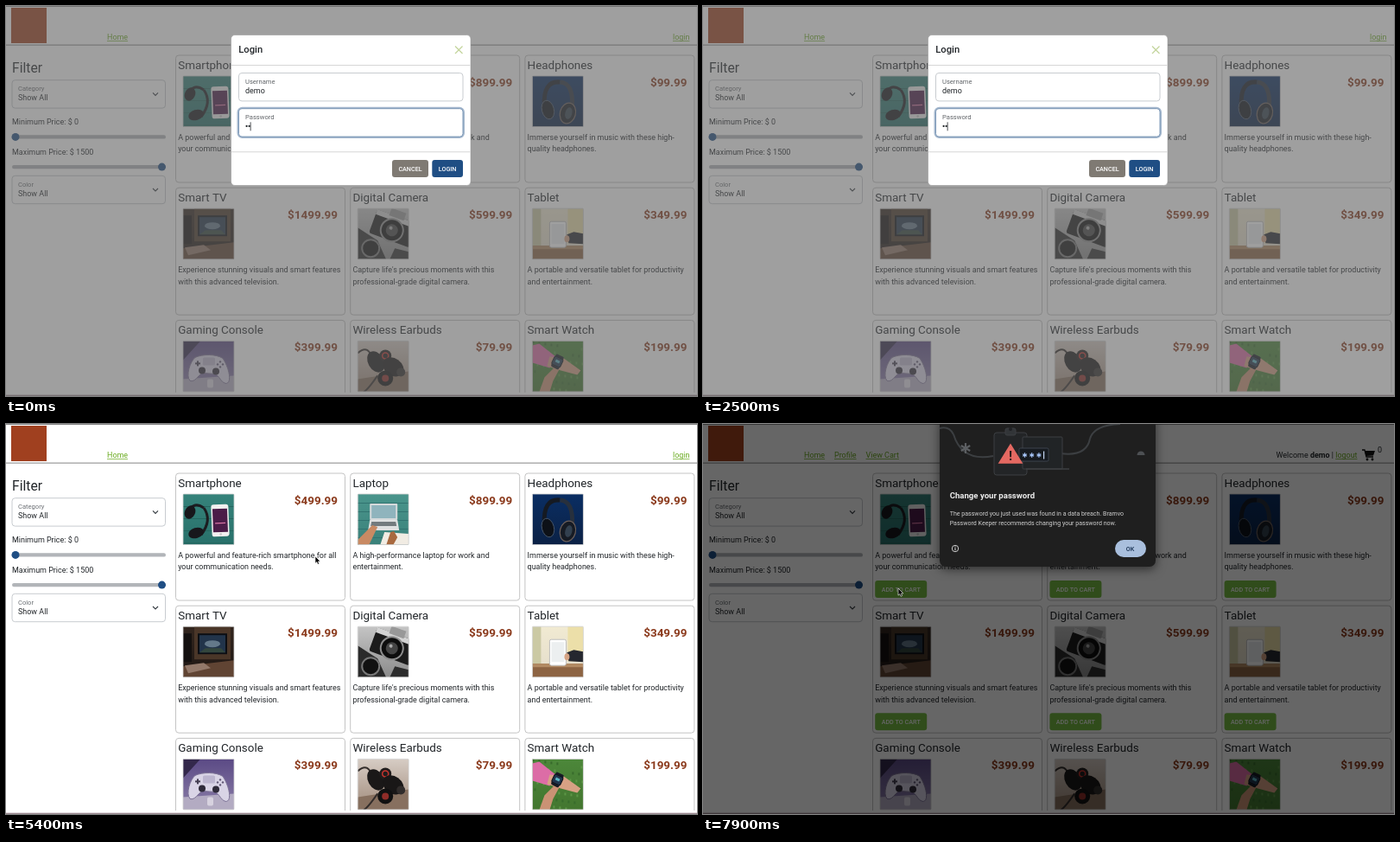
Recreate the animation shown at these times as an HTML page with a canvas. Size 800 px wide and 451 px high, loop 8000 ms.

```html
<!DOCTYPE html>
<html lang="en">
<head>
<meta charset="utf-8">
<title>Shop login</title>
<style>
  html, body { margin: 0; width: 100%; height: 100%; overflow: hidden; background: #fff; }
  canvas { display: block; width: 800px; height: 451px; }
</style>
</head>
<body>
<canvas id="stage" width="800" height="451"></canvas>
<script>
const c = document.getElementById('stage').getContext('2d');
const LOOP = 8000, STEP = 100;
const BODY = 8.96, HEAD = 13.44, LABEL = 7.6, BUTTON = 7.2;
const INK = '#212529', GREEN = '#6aab1f', RUST = '#a0401f', NAVY = '#1f4e84';
const ACCOUNT = 'demo';

// Times (ms) of the story
const MODAL_END = 4600, LOGGED_IN = 7000, ALERT_START = 7800;
const TYPE_START = 2600, TYPE_STEP = 120;
// [time, x, y] of the pointer tip
const PATH = [[3600, 452, 150], [4300, 511, 193], [4700, 511, 193], [5300, 358, 153],
  [5500, 358, 153], [6200, 337, 180], [6800, 337, 180], [7600, 226, 190]];

// ---- helpers ----
function text(s, x, y, size, color = INK, weight = 400, align = 'left') {
  c.font = `${weight} ${size}px Roboto, sans-serif`;
  c.textAlign = align;
  c.fillStyle = color;
  c.fillText(s, x, y);
}
function rect(x, y, w, h, color) {
  c.fillStyle = color;
  c.fillRect(x, y, w, h);
}
function box(x, y, w, h, r, fill, stroke, line = 1) {
  c.beginPath();
  c.roundRect(x, y, w, h, r);
  paint(fill, stroke, line);
}
function paint(fill, stroke, line = 1) {
  if (fill) { c.fillStyle = fill; c.fill(); }
  if (stroke) { c.strokeStyle = stroke; c.lineWidth = line; c.stroke(); }
}
function disc(x, y, rx, fill, stroke, line, ry = rx, turn = 0) {
  c.beginPath();
  c.ellipse(x, y, rx, ry, turn, 0, 7);
  paint(fill, stroke, line);
}
function poly(points, fill, stroke, line) {
  c.beginPath();
  for (let i = 0; i < points.length; i += 2) c.lineTo(points[i], points[i + 1]);
  if (fill) c.closePath();
  paint(fill, stroke, line);
}
function curve(x1, y1, x2, y2, x3, y3, color, line) {
  c.beginPath();
  c.moveTo(x1, y1);
  c.quadraticCurveTo(x2, y2, x3, y3);
  paint(null, color, line);
}
function turned(x, y, angle, draw) {
  c.save();
  c.translate(x, y);
  c.rotate(angle);
  draw();
  c.restore();
}
function shade(top, bottom) {
  const g = c.createLinearGradient(0, 0, 0, 59);
  g.addColorStop(0, top);
  g.addColorStop(1, bottom);
  rect(0, 0, 59, 59, g);
}
function planks(step, color) {
  for (let y = step; y < 59; y += step) rect(0, y, 59, 1, color);
}
function link(s, x, y, color = GREEN) {
  text(s, x, y, BODY, color);
  rect(x, y + 1.2, c.measureText(s).width, 0.7, color);
}
function button(s, x, y, w, color) {
  box(x, y, w, 20, 3, color);
  text(s, x + w / 2, y + 12.7, BUTTON, '#fff', 500, 'center');
}

// ---- product pictures, 59 by 59 ----
function phonePic() {
  shade('#36837b', '#28706a');
  planks(14, '#25665f');
  curve(7, 20, 12, 8, 24, 16, '#1c1c20', 3);
  curve(24, 16, 34, 30, 21, 47, '#1c1c20', 3);
  disc(8, 21, 6, '#17171b', null, 0, 8, 0.4);
  disc(15, 45, 9, '#17171b', null, 0, 6, -0.3);
  turned(43, 31, -0.04, () => {
    box(-10, -19, 20, 37, 3, '#f2f0f0');
    rect(-8.5, -14, 17, 27, '#4b1c48');
    rect(-6, 2, 12, 1.2, '#d774a4');
    disc(0, 15.5, 1.4, '#ccc');
  });
}
function laptopPic() {
  shade('#4a958c', '#3a817a');
  planks(10, '#317370');
  box(14, 11, 32, 19, 1, '#d5dadb');
  rect(16, 13, 28, 15, '#8fb4bd');
  poly([14, 30, 46, 30, 48, 42, 12, 42], '#dfe1e1');
  poly([16, 32, 44, 32, 45, 37, 15, 37], '#737b7e');
  poly([26, 59, 31, 44, 59, 46, 59, 59], '#f1ece3');
  poly([0, 59, 0, 53, 17, 36, 23, 38, 13, 59], '#c98a63');
  poly([33, 59, 38, 44, 42, 43, 46, 50, 41, 59], '#a8693f');
}
function headphonePic() {
  shade('#0a2e63', '#0b2145');
  curve(14, 35, 12, 5, 32, 7, '#151a22', 5);
  curve(32, 7, 48, 8, 46, 37, '#27303d', 5);
  disc(18, 39, 7, '#0d1118', '#465568', 1, 11, -0.25);
  disc(41, 43, 9, '#161b24', '#6c5f5a', 1.2, 12, 0.25);
  disc(42, 43, 4, '#32404f', null, 0, 7, 0.25);
}
function tvPic() {
  shade('#33261e', '#1d1613');
  rect(13, 0, 42, 38, '#4a3628');
  rect(17, 8, 34, 24, '#0c0e13');
  rect(19, 10, 30, 20, '#22344a');
  disc(34, 20, 9, '#64798a', null, 0, 4);
  poly([19, 30, 26, 25, 44, 25, 49, 30], '#33463d');
  poly([0, 46, 59, 39, 59, 59, 0, 59], '#604433');
  poly([2, 45, 24, 42, 32, 48, 6, 54], '#93796a');
  rect(0, 8, 10, 33, '#14100f');
}
function cameraPic() {
  shade('#c4c4c4', '#8b8b8b');
  poly([0, 22, 23, 37, 33, 59, 0, 59], '#2a2a2a');
  turned(40, 21, 0.35, () => {
    box(-23, -13, 50, 29, 3, '#1b1b1b');
    rect(-23, -13, 50, 6, '#d2d2d2');
    rect(-8, -20, 18, 9, '#989898');
    disc(1, 4, 13, '#0d0d0d', '#8d8d8d', 2);
    disc(1, 4, 7, '#454545');
    disc(-1, 2, 2, '#aaa');
  });
  disc(15, 46, 10, '#111', '#777', 2);
  poly([37, 59, 43, 46, 59, 50, 59, 59], '#2c2c2c');
}
function tabletPic() {
  shade('#f1ead2', '#e3dccb');
  rect(0, 0, 10, 44, '#cbc9a4');
  rect(41, 0, 18, 40, '#ecdfa9');
  rect(0, 43, 59, 16, '#8d6443');
  rect(0, 43, 59, 4, '#b28a63');
  box(20, 15, 19, 30, 2, '#fff', '#bdbdbd');
  rect(22, 18, 15, 23, '#eceff0');
  poly([40, 30, 48, 27, 59, 29, 59, 41, 42, 40], '#25272f');
  disc(40, 35, 3, '#d5a384', null, 0, 4);
}
function consolePic() {
  shade('#5b4a85', '#8b7ea8');
  poly([0, 0, 20, 0, 0, 22], '#33284b');
  poly([0, 59, 0, 44, 59, 40, 59, 59], '#b3abc2');
  c.beginPath();
  c.moveTo(14, 19);
  c.bezierCurveTo(23, 15, 38, 15, 46, 20);
  c.bezierCurveTo(54, 32, 57, 50, 49, 49);
  c.bezierCurveTo(43, 47, 42, 40, 37, 38);
  c.lineTo(22, 37);
  c.bezierCurveTo(17, 40, 14, 48, 8, 46);
  c.bezierCurveTo(3, 40, 8, 24, 14, 19);
  paint('#d9d4e6', '#7d7396');
  box(23, 19, 14, 9, 1.5, '#bcb5cf');
  disc(22, 34, 4, '#2f2b3a');
  disc(38, 35, 4, '#2f2b3a');
  rect(14, 25, 6, 2, '#443e52');
  rect(16, 23, 2, 6, '#443e52');
  for (let i = 0; i < 4; i++) disc(43 + 3 * Math.cos(i * 1.571), 27 + 3 * Math.sin(i * 1.571), 1.2, '#605775');
  box(28, 44, 7, 10, 2, '#d7d2df');
}
function budsPic() {
  shade('#d6ccc4', '#a08a7a');
  poly([0, 59, 0, 44, 59, 35, 59, 59], '#87705f');
  curve(0, 14, 13, 2, 18, 24, '#332d2b', 2);
  curve(23, 40, 12, 56, 7, 59, '#332d2b', 2);
  disc(21, 24, 9, '#1a1818', null, 0, 13, -0.5);
  disc(32, 17, 7, '#211d1d');
  disc(32, 17, 3.5, '#211d1d', '#c9342e', 1.5);
  disc(41, 30, 13, '#191717', null, 0, 10, 0.6);
  disc(32, 43, 9, '#111');
  disc(32, 43, 4, '#8f2c28');
  disc(50, 36, 5, '#302c2b');
}
function watchPic() {
  shade('#4c873a', '#43762f');
  for (let i = 0; i < 40; i++) rect(i * 23 % 59, i * 37 % 59, 2, 3, i % 2 ? '#5c9646' : '#386b2c');
  poly([0, 5, 8, 3, 27, 18, 20, 31, 0, 25], '#dc6da6');
  poly([20, 18, 35, 19, 56, 34, 52, 39, 33, 34, 17, 29], '#d7a184');
  poly([8, 59, 14, 42, 27, 29, 31, 33, 24, 46, 20, 59], '#cb9274');
  turned(29, 24, 0.45, () => {
    box(-5, -8, 10, 16, 2, '#171b24');
    box(-5.5, -5, 11, 10, 2, '#20344b', '#0d1118');
    rect(-2.5, -2, 5, 3, '#5bb5c3');
  });
}

const PRODUCTS = [
  ['Smartphone', '499.99', 'A powerful and feature-rich smartphone for all', 'your communication needs.', phonePic],
  ['Laptop', '899.99', 'A high-performance laptop for work and', 'entertainment.', laptopPic],
  ['Headphones', '99.99', 'Immerse yourself in music with these high-', 'quality headphones.', headphonePic],
  ['Smart TV', '1499.99', 'Experience stunning visuals and smart features', 'with this advanced television.', tvPic],
  ['Digital Camera', '599.99', "Capture life's precious moments with this", 'professional-grade digital camera.', cameraPic],
  ['Tablet', '349.99', 'A portable and versatile tablet for productivity', 'and entertainment.', tabletPic],
  ['Gaming Console', '399.99', '', '', consolePic],
  ['Wireless Earbuds', '79.99', '', '', budsPic],
  ['Smart Watch', '199.99', '', '', watchPic]
];

function card([name, price, line1, line2, picture], i, member) {
  const x = 196.5 + i % 3 * 202.2, y = 57 + Math.floor(i / 3) * 153.2;
  box(x, y, 196, 147, 3.5, '#fff', '#c4c4c4');
  text(name, x + 2.7, y + 16, HEAD);
  text('$' + price, x + 187.5, y + 36, HEAD, '#8b3a1c', 700, 'right');
  c.save();
  c.translate(x + 8.5, y + 24);
  c.beginPath();
  c.rect(0, 0, 59, 58.5);
  c.clip();
  picture();
  c.restore();
  box(x + 8.5, y + 24, 59, 58.5, 1, null, '#d0d0d0', 0.8);
  text(line1, x + 2.7, y + 98, BODY);
  text(line2, x + 2.7, y + 111.3, BODY);
  if (member) button('ADD TO CART', x + 2.7, y + 124, 60, '#78bf45');
}
function select(label, y) {
  box(7, y, 177.5, 32.4, 3.5, '#fff', '#c8ccd0');
  text(label, 14, y + 12.7, LABEL, '#6c7075');
  text('Show All', 14, y + 23.5, BODY);
  poly([170, y + 14.7, 173, y + 17.7, 176, y + 14.7], null, '#343a40', 1.1);
}
function slider(label, y, knob) {
  text(label, 7, y, BODY);
  box(7, y + 12.2, 178, 4.4, 2.2, '#b2b5b9');
  disc(knob, y + 14.4, 4.5, NAVY);
}
function cartIcon() {
  poly([763, 30, 766, 30, 768, 38, 776, 38], null, '#111', 1.3);
  poly([766, 31, 778, 31, 776, 36.5, 767.5, 37], '#111');
  disc(769, 41, 1.4, '#111');
  disc(775, 41, 1.4, '#111');
}
function greeting(right) {
  const parts = [['logout', 400], [' | ', 400], [ACCOUNT, 700], ['Welcome ', 400]];
  let x = right;
  for (const [s, weight] of parts) {
    c.font = `${weight} ${BODY}px Roboto, sans-serif`;
    x -= c.measureText(s).width;
    if (s === 'logout') link(s, x, 39);
    else text(s, x, 39, BODY, INK, weight);
  }
}
function header(member) {
  rect(6, 2, 41, 41, RUST);
  link('Home', 117, 39);
  rect(0, 44.6, 800, 1, '#858585');
  if (!member) return link('login', 772, 39);
  link('Profile', 152, 39);
  link('View Cart', 188.5, 39);
  greeting(757.5);
  cartIcon();
  text('0', 781, 33, BODY);
}
function page(member) {
  rect(0, 0, 800, 451, '#fff');
  header(member);
  text('Filter', 7, 77, 15.68);
  select('Category', 85.7);
  slider('Minimum Price: $ 0', 137, 11);
  slider('Maximum Price: $ 1500', 171.7, 180.5);
  select('Color', 196.3);
  c.save();
  c.beginPath();
  c.rect(190, 50, 610, 397);
  c.clip();
  PRODUCTS.forEach((p, i) => card(p, i, member));
  c.restore();
  rect(0, 0, 800, 1, '#8b8b8b');
  rect(0, 449.7, 800, 1.3, '#9b8991');
}

// ---- login window ----
function field(label, y, focus) {
  if (focus) box(269.5, y, 259.5, 32.4, 4, null, '#a5b8ce', 4);
  box(269.5, y, 259.5, 32.4, 3.5, '#fff', focus ? '#7b97b6' : '#c8ccd0');
  text(label, 277, y + 12.6, LABEL, '#62666a');
}
function modal(t) {
  rect(0, 0, 800, 451, 'rgba(96,96,96,.6)');
  box(260.5, 33.5, 277.5, 174, 4.5, '#fff', '#999', 0.6);
  text('Login', 269.3, 54, 11.2, INK, 500);
  poly([520, 46.5, 528.5, 55], null, '#c3d59c', 1.2);
  poly([528.5, 46.5, 520, 55], null, '#c3d59c', 1.2);
  rect(261, 68, 276.5, 0.8, '#ccc');
  rect(261, 168.4, 276.5, 0.8, '#ccc');
  field('Username', 77.5);
  text(ACCOUNT, 277, 101, BODY);
  field('Password', 118.7, true);

  const typed = Math.floor((t - TYPE_START) / TYPE_STEP) + 1;
  const dots = Math.max(2, Math.min(8, typed + 2));
  for (let i = 0; i < dots; i++) disc(278.6 + i * 3.05, 138.9, 1.1, INK);
  const typing = t >= TYPE_START && typed < 9;
  if (typing || t % 1060 < 530) rect(277.2 + dots * 3.05 - 0.6, 134.3, 0.8, 10, INK);

  const [x, y] = pointerAt(t);
  const hover = t >= PATH[0][0] && x > 493 && y > 178;
  button('CANCEL', 447, 178, 42, '#7f7a73');
  button('LOGIN', 493.3, 178, 35.7, hover ? '#143a68' : NAVY);
}

// ---- password alert ----
function star(x, y, r, color, line) {
  for (let i = 0; i < 3; i++) {
    const dx = r * Math.sin(i * Math.PI / 3), dy = r * Math.cos(i * Math.PI / 3);
    poly([x - dx, y - dy, x + dx, y + dy], null, color, line);
  }
}
function alertArt() {
  const line = '#3c3f42';
  curve(274, 5, 285, 2, 290, 12, line, 2);
  curve(290, 12, 300, 44, 336, 37, line, 2);
  curve(414, 34, 444, 38, 448, 17, line, 2);
  curve(448, 17, 453, 1, 483, 0, line, 2);
  star(304, 28, 6, '#5c5f62', 2.2);
  box(337, 10, 38, 49, 3, '#232527', line);
  box(350, 5, 12, 8, 2, '#323538', line);
  disc(356, 6, 2, '#202124');
  box(370, 15, 46, 37, 1, '#212426', line);
  poly([374, 52, 424, 52], null, line, 1.5);
  box(366, 28, 34, 15, 1.5, '#171b20', '#444d58', 0.8);
  for (let i = 0; i < 3; i++) star(372.5 + i * 8.2, 36, 2.7, '#a8c7fa', 1.2);
  rect(394, 31.5, 1.2, 9, '#c4d7f2');
  poly([356, 24, 369, 45, 343, 45], '#e46962', '#e46962', 1.5);
  text('!', 356, 42, 15, '#261b1a', 700, 'center');
  c.beginPath();
  c.arc(507, 36, 4.5, Math.PI, 0);
  paint('#4d5053');
}
function alertBox(alpha) {
  rect(0, 0, 800, 451, `rgba(0,0,0,${0.6 * alpha})`);
  c.save();
  c.globalAlpha = alpha;
  c.shadowColor = 'rgba(0,0,0,.55)';
  c.shadowBlur = 12;
  c.shadowOffsetY = 3;
  box(274, -10, 250, 175, 7, '#1f1f1f');
  c.shadowColor = 'transparent';
  alertArt();
  text('Change your password', 285.7, 86, 9.6, '#eee', 700);
  text('The password you just used was found in a data breach. Bramvo', 285.7, 106, 7.06, '#cfcfcf');
  text('Password Keeper recommends changing your password now.', 285.7, 117, 7.06, '#cfcfcf');
  disc(292, 144, 3.7, null, '#ddd', 0.9);
  rect(291.5, 143.2, 1, 3, '#ddd');
  rect(291.5, 141.5, 1, 1, '#ddd');
  box(477, 134, 36, 20, 10, '#a9bfdd');
  text('OK', 494.5, 146.6, 7.2, '#173052', 500, 'center');
  c.restore();
}

// ---- pointer ----
function pointerAt(t) {
  const next = PATH.findIndex(p => p[0] > t);
  if (next < 0) return PATH[PATH.length - 1].slice(1);
  if (next === 0) return PATH[0].slice(1);
  const [t0, x0, y0] = PATH[next - 1], [t1, x1, y1] = PATH[next];
  const u = (t - t0) / (t1 - t0), k = u * u * (3 - 2 * u);
  return [x0 + (x1 - x0) * k, y0 + (y1 - y0) * k];
}
function pointer(t) {
  if (t < PATH[0][0]) return;
  turned(...pointerAt(t), 0, () =>
    poly([0, 0, 0, 8.2, 1.8, 6.5, 3, 9.3, 4.6, 8.6, 3.4, 5.9, 5.9, 5.9], '#000', '#fff', 0.6));
}

function draw(t) {
  page(t >= LOGGED_IN);
  if (t < MODAL_END) modal(t);
  if (t >= ALERT_START) alertBox(Math.min(1, (t - ALERT_START + STEP) / (2 * STEP)));
  pointer(t);
}

let last = -1;
function tick() {
  const t = Math.floor(performance.now() % LOOP / STEP) * STEP;
  if (t !== last) draw(last = t);
  requestAnimationFrame(tick);
}
tick();
</script>
</body>
</html>
```
